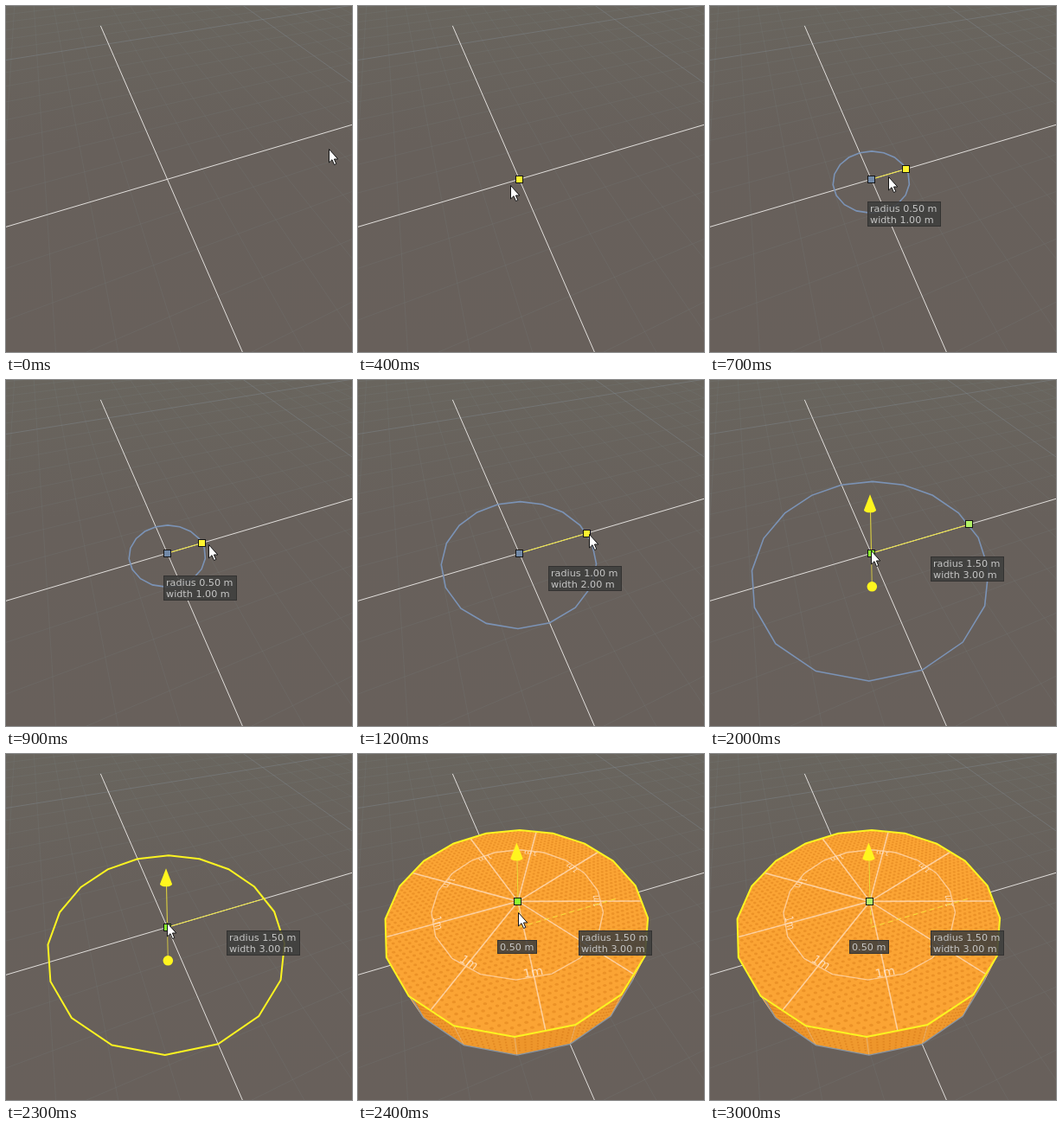
An HTML page with a canvas that plays this animation: 400 px wide and 400 px high, repeating every 3.8 s.

```html
<!DOCTYPE html>
<html lang="en">
<head>
<meta charset="utf-8">
<title>Cylinder tool</title>
<style>
  html, body { margin: 0; width: 100%; height: 100%; overflow: hidden; background: #68615c; }
  canvas { display: block; width: 400px; height: 400px; }
</style>
</head>
<body>
<canvas id="stage" width="400" height="400"></canvas>
<script>
const ctx = document.getElementById('stage').getContext('2d');
const LOOP = 3800, STEP = 100, SIDES = 18;
const YELLOW = '#fbf421', BLUE = '#7b93b6', GREEN = '#b2f266', HOT_GREEN = '#8cff30';

// Cursor tip, one entry per step; it leaves the stage afterwards.
const cursorPath = [
  [373, 165], [345, 172], [240, 199], [145, 226], [176, 207], [183, 201], [185, 200],
  [206, 197], [222, 193], [234, 190], [250, 185], [262, 181], [267, 178], [267, 178],
  [284, 173], [296, 168], [297, 168], [272, 176], [214, 192], [163, 203], [186, 197],
  [186, 197], [186, 196], [186, 195], [185, 183], [185, 182], [185, 181], [185, 181],
  [185, 181], [286, 147]
];

// Perspective camera: x to the right, z away, h up; one unit is one metre.
function project(x, z, h = 0) {
  const w = 1 + 0.068 * x + 0.1745 * z - 0.188 * h;
  return [186.5 + (83.2 * x - 28.9 * z - 2.8 * h) / w,
          200.3 - (24.55 * x + 66.45 * z + 54.2 * h) / w];
}
const polar = (r, deg, h) => {
  const a = deg * Math.PI / 180;
  return project(r * Math.sin(a), r * Math.cos(a), h);
};
const ring = (r, h) => Array.from({ length: SIDES }, (_, i) => polar(r, i * 360 / SIDES, h));

function trace(points, closed) {
  ctx.beginPath();
  points.forEach(p => ctx.lineTo(...p));
  if (closed) ctx.closePath();
}
function stroke(points, color, width = 1, closed = false) {
  trace(points, closed);
  ctx.strokeStyle = color;
  ctx.lineWidth = width;
  ctx.stroke();
}
function fill(points, color) {
  trace(points, true);
  ctx.fillStyle = color;
  ctx.fill();
}

function drawGround() {
  const shade = ctx.createLinearGradient(0, 0, 0, 400);
  shade.addColorStop(0, '#69655e');
  shade.addColorStop(0.4, '#67605b');
  shade.addColorStop(1, '#68605b');
  ctx.fillStyle = shade;
  ctx.fillRect(0, 0, 400, 400);
  for (let i = -16; i <= 24; i++) {
    if (!i) continue;
    const k = i / 2;
    const color = i % 8 ? 'rgba(122,128,128,.2)' : 'rgba(130,138,146,.42)';
    if (k > -5) stroke([project(-3.5, Math.max(k, -4)), project(16, Math.max(k, -4))], color);
    stroke([project(k, k < -3 ? 0 : -3), project(k, 20)], color);
  }
  stroke([project(-3, 0), project(5, 0)], '#e2dfdc');
  stroke([project(0, -3), project(0, 5)], '#e2dfdc');
}

function drawDots(h) {
  const gap = 0.064;
  ctx.fillStyle = 'rgba(214,122,22,.42)';
  for (let row = -27; row <= 27; row++) {
    for (let col = -25; col <= 25; col++) {
      const x = (col + (row & 1) / 2) * gap, z = row * gap * 0.87;
      const [px, py] = project(x, z, h);
      const size = 1.75 / (1 + 0.068 * x + 0.1745 * z);
      ctx.beginPath();
      ctx.ellipse(px, py, size, size * 0.72, 0, 0, 7);
      ctx.fill();
    }
  }
}

// Text lying on the top face, its foot pointing outwards.
function drawMark(deg, h) {
  const o = polar(0.94, deg, h), u = polar(0.94, deg - 1, h), v = polar(0.95, deg, h);
  const su = 1 / (0.94 * Math.PI / 180) / 83, sv = 100 / 83;
  ctx.save();
  ctx.transform((u[0] - o[0]) * su, (u[1] - o[1]) * su, (v[0] - o[0]) * sv, (v[1] - o[1]) * sv, ...o);
  ctx.font = '10px "DejaVu Sans", sans-serif';
  ctx.textAlign = 'center';
  ctx.fillStyle = 'rgba(255,232,208,.85)';
  ctx.fillText('1m', 0, 3);
  ctx.restore();
}

function drawSolid(r, h) {
  const base = ring(r, 0), top = ring(r, h);
  base.forEach((p, i) => {
    const j = (i + 1) % SIDES;
    fill([p, base[j], top[j], top[i]], i % 2 ? '#ee962b' : '#f09a2e');
  });
  ctx.fillStyle = 'rgba(200,105,15,.35)';
  for (let deg = 100; deg < 290; deg += 2.2) {
    for (let y = 0.05; y < h; y += 0.075) {
      const p = polar(r * 0.985, deg, y);
      ctx.fillRect(p[0] - 1, p[1] - 1, 2, 1.6);
    }
  }
  base.forEach((p, i) => stroke([p, top[i]], i > 6 && i < 13 ? 'rgba(255,214,160,.55)' : BLUE));
  stroke(base, '#8b96a2', 1.3, true);

  fill(top, '#fba434');
  ctx.save();
  trace(top, true);
  ctx.clip();
  drawDots(h);
  for (let deg = 30; deg < 390; deg += 40) {
    stroke([polar(0, 0, h), polar(r, deg, h)], 'rgba(255,220,185,.8)', 1.6);
    drawMark(deg, h);
  }
  stroke(ring(1, h), 'rgba(255,218,180,.75)', 1.4, true);
  ctx.restore();
  stroke(top, YELLOW, 2, true);

  ctx.setLineDash([6, 4]);
  stroke([project(0, 0, h), project(0, 0), project(r, 0)], '#f6e23a');
  ctx.setLineDash([]);
}

function drawHandle([x, y], color) {
  x = Math.floor(x);
  y = Math.floor(y);
  ctx.fillStyle = '#141414';
  ctx.fillRect(x - 4, y - 4, 9, 9);
  ctx.fillStyle = color;
  ctx.fillRect(x - 3, y - 3, 7, 7);
}

function drawArrow([x, y], withBall) {
  stroke([[x, y], [x - 1, y - 50]], '#e9dc3c');
  ctx.fillStyle = '#fff51e';
  ctx.beginPath();
  ctx.moveTo(x - 1.5, y - 68);
  ctx.lineTo(x + 5.5, y - 50);
  ctx.ellipse(x - 1.5, y - 50, 7, 3, 0, 0, Math.PI);
  ctx.fill();
  if (!withBall) return;
  stroke([[x, y], [x + 0.8, y + 38]], '#cfc445');
  ctx.beginPath();
  ctx.arc(x + 0.8, y + 38.5, 5.8, 0, 7);
  ctx.fill();
}

function drawTip(x, y, width, lines) {
  const height = 3 + 13 * lines.length;
  ctx.fillStyle = 'rgba(62,62,61,.88)';
  ctx.fillRect(x, y, width, height);
  ctx.strokeStyle = '#333231';
  ctx.lineWidth = 1;
  ctx.strokeRect(x + 0.5, y + 0.5, width - 1, height - 1);
  ctx.font = '11.2px "DejaVu Sans", sans-serif';
  ctx.fillStyle = '#c6c6c5';
  lines.forEach((line, i) => ctx.fillText(line, x + 3, y + 12 + 13 * i));
}

function drawCursor([x, y]) {
  const shape = [[0.5, 0.5], [0.5, 16], [4, 12.7], [6.5, 18.5], [8.8, 17.5], [6.4, 12], [10.8, 12]];
  const points = shape.map(p => [x + p[0], y + p[1]]);
  fill(points, '#fff');
  stroke(points, '#151515', 1, true);
}

function draw(step) {
  const radius = step < 7 ? 0 : step < 10 ? 0.5 : step < 14 ? 1 : 1.5;
  const height = step < 24 ? 0 : 0.5;
  const pressed = step >= 22;
  const centre = project(0, 0, height);
  drawGround();

  if (!radius) {
    const snapped = step === 2 ? 0.5 : step === 3 ? -0.5 : 0;
    if (step > 1) drawHandle(project(snapped, 0), '#fff430');
  } else {
    const edge = project(radius, 0);
    if (height) {
      drawSolid(radius, height);
    } else {
      stroke(ring(radius, 0), pressed ? YELLOW : BLUE, pressed ? 2 : 1.6, true);
      stroke([centre, edge], '#f0e63a');
    }
    if (step >= 15) drawArrow(centre, !height);
    const hot = step >= 20 && step < 29;
    drawHandle(centre, step < 15 ? '#7189a8' : hot ? HOT_GREEN : GREEN);
    if (!pressed) drawHandle(edge, step < 17 ? '#fff430' : GREEN);

    drawTip(Math.floor(edge[0]) - 44, Math.floor(edge[1]) + 38, 85,
      [`radius ${radius.toFixed(2)} m`, `width ${(radius * 2).toFixed(2)} m`]);
    if (height) drawTip(161, 215, 46, [`${height.toFixed(2)} m`]);
  }
  if (cursorPath[step]) drawCursor(cursorPath[step]);
}

const start = performance.now();
let shown = -1;
function tick() {
  const step = Math.floor(((performance.now() - start) % LOOP) / STEP);
  if (step !== shown) draw(shown = step);
  requestAnimationFrame(tick);
}
tick();
</script>
</body>
</html>
```
